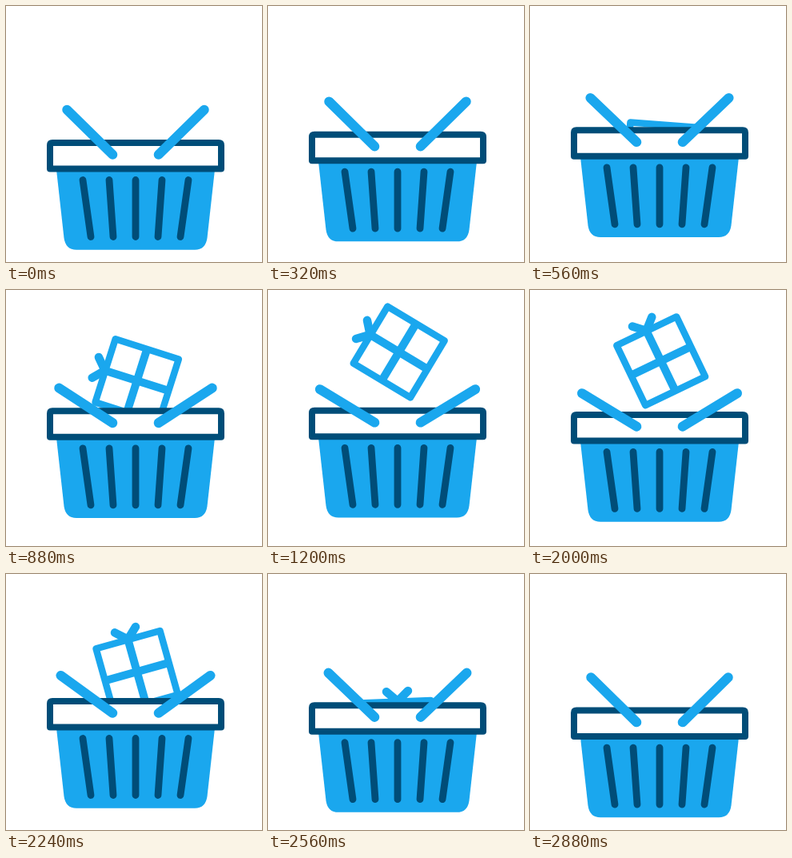
Recreate the animation shown at these times as an HTML page. Size 320 by 320 pixels, loop 2960 ms.

```html
<!DOCTYPE html>
<html lang="en">
<head>
<meta charset="utf-8">
<title>Shopping basket</title>
<style>
  html, body { margin: 0; width: 100%; height: 100%; overflow: hidden; background: #fff; }
  svg { display: block; width: 100%; height: 100%; }
  .light, .dark { fill: none; stroke-linecap: round; stroke-linejoin: round; }
  .light { stroke: #1aa7ee; }
  .dark { stroke: #004d78; }
</style>
</head>
<body>
<svg viewBox="0 0 320 320">
  <g id="gift" class="light" stroke-width="8.5">
    <rect x="-41.5" y="-41.5" width="83" height="83" fill="#fff"/>
    <path d="M0-41V41M-41 0H41" stroke-width="10" stroke-linecap="butt"/>
    <path d="M-13.5-54.5L0-42L13.5-54.5" stroke-width="10.5"/>
  </g>
  <g id="basket">
    <path fill="#1aa7ee" d="M62.7 202L72.5 290Q74.5 304.7 88 304.7H236Q249.5 304.7 251.5 290L261.3 202Z"/>
    <path id="slots" class="dark" stroke-width="8.8"/>
    <path class="dark" fill="#fff" style="fill:#fff" stroke-width="8" d="M55 203.5V174Q55 171 58 171H266Q269 171 269 174V203.5Z"/>
    <path id="handles" class="light" stroke-width="12"/>
  </g>
</svg>
<script>
const LOOP = 2960, STEP = 80;
const [gift, basket, slots, handles] =
  ['gift', 'basket', 'slots', 'handles'].map(id => document.getElementById(id));

const clamp = (v, lo, hi) => Math.min(hi, Math.max(lo, v));

function smooth(t, from, to) {
  const u = clamp((t - from) / (to - from), 0, 1);
  return u * u * (3 - 2 * u);
}

// Five bars leaning towards the middle
slots.setAttribute('d', [-2, -1, 0, 1, 2].map(i =>
  `M${162 + 33 * i} 217.5L${162 + 28 * i} 288.5`).join(''));

// Basket rises and falls like a thrown object
function lift(t) {
  const peak = 1070, land = 2900;
  const u = t < peak ? 1 - t / peak : (t - peak) / (land - peak);
  return 20.3 * Math.max(0, 1 - u * u);
}

// Gift leaves the basket, hangs at the top and drops back, hidden below 235
function giftY(t) {
  const d = (t - 1520) / 1000;
  return Math.min(235, 69.8 + (d < 0 ? 133 : 119) * Math.abs(d) ** 2.5);
}

function draw(t) {
  const spin = clamp((t - 2616) / 24, -90, 0);
  gift.setAttribute('transform', `translate(163.7 ${giftY(t)}) rotate(${spin})`);
  basket.setAttribute('transform', `translate(0 ${-lift(t)})`);

  const open = smooth(t, 480, 1000) - smooth(t, 1960, 2660);
  const tilt = (44.5 - 13.3 * open) * Math.PI / 180;
  const dx = 80 * Math.cos(tilt), dy = 80 * Math.sin(tilt);
  handles.setAttribute('d', `M133.3 185.8l${-dx} ${-dy}M190.7 185.8l${dx} ${-dy}`);
}

const start = performance.now();
function tick() {
  const t = (performance.now() - start) % LOOP;
  draw(Math.floor(t / STEP) * STEP);
  requestAnimationFrame(tick);
}
tick();
</script>
</body>
</html>
```
